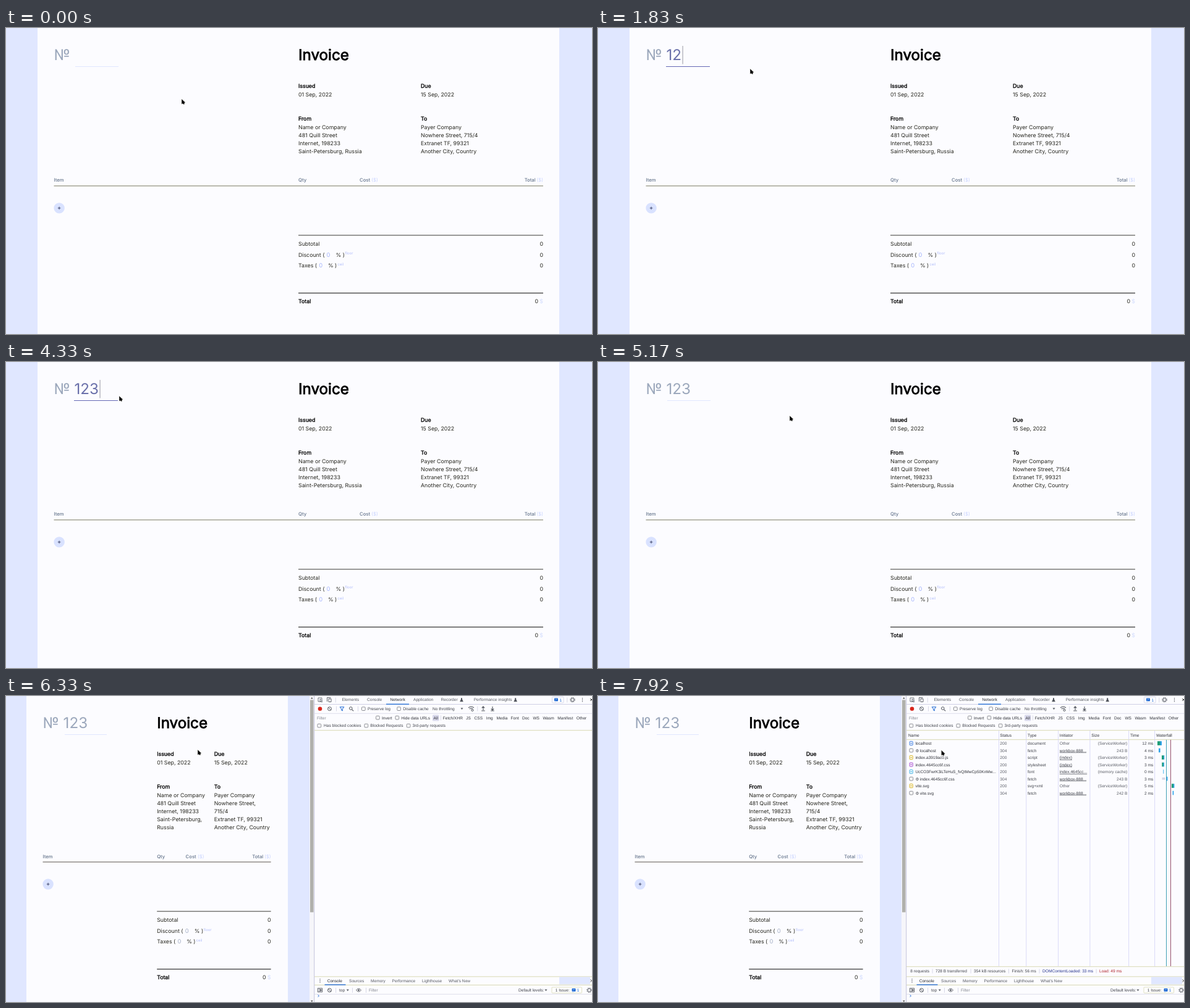
Recreate the animation shown at these times as an HTML page. Size 948x496 px, loop 8 s.

```html
<!DOCTYPE html>
<html lang="en">
<head>
<meta charset="utf-8">
<title>Invoice</title>
<style>
  html, body { margin: 0; width: 100%; height: 100%; overflow: hidden; background: #fcfcff; }
  svg { display: block; width: 948px; height: 496px; }
  text { white-space: pre; text-rendering: geometricPrecision; }
  .page text { font-family: Inter, sans-serif; }
  .page .bold { stroke: #000; stroke-width: .036em; }
  .tools text { font-family: "Liberation Sans", "DejaVu Sans", sans-serif; }
</style>
</head>
<body>
<svg id="stage" viewBox="0 0 948 496" xmlns="http://www.w3.org/2000/svg"></svg>
<script>
const LOOP = 8000, STEP = 1000 / 12;
const PAPER = '#fcfcff', LILAC = '#e0e7ff', INK = '#26261e', PALE = '#c7d2fe',
      SLATE = '#64748b', MUTED = '#9ca8bc', GREY = '#5c5f67', BLUE = '#1a66d2', RULE = '#d9d9b4';

const text = (x, y, str, size, fill, extra = '') =>
  `<text x="${x}" y="${y}" font-size="${size}" fill="${fill}" ${extra}>${str}</text>`;
const rect = (x, y, w, h, fill, extra = '') =>
  `<rect x="${x}" y="${y}" width="${w}" height="${h}" fill="${fill}" ${extra}/>`;
const path = (d, stroke, width = 1, fill = 'none') =>
  `<path d="${d}" stroke="${stroke}" stroke-width="${width}" fill="${fill}"/>`;
const group = (id, body, cls = '') => `<g id="${id}" class="${cls}">${body}</g>`;
const END = 'text-anchor="end"', BOLD = 'class="bold"', MEDIUM = 'font-weight="500"';

// ---------- invoice ----------
const FROM = ['Name or Company', '481 Quill Street', 'Internet, 198233', 'Saint-Petersburg, Russia'];
const TO = ['Payer Company', 'Nowhere Street, 715/4', 'Extranet TF, 99321', 'Another City, Country'];
const FROM_WRAPPED = [...FROM.slice(0, 3), 'Saint-Petersburg,', 'Russia'];
const TO_WRAPPED = [TO[0], 'Nowhere Street,', '715/4', ...TO.slice(2)];

const WIDE = { paper: [51, 844], left: 77.5, mid: 473, col: 671, cost: 572, right: 869, drop: 0,
               from: FROM, to: TO, zero: '#a5b4fc', rule: '#85856f' };
const NARROW = { paper: [33, 423], left: 59.5, mid: 244.2, col: 336.7, cost: 290.6, right: 428.6, drop: 13.1,
                 from: FROM_WRAPPED, to: TO_WRAPPED, zero: '#a5afc6', rule: '#6a645c' };

function page(p) {
  const body = (x, y, str, extra) => text(x, y, str, 8.8, INK, extra);
  const label = (x, y, str) => text(x, y, str, 8.8, '#000', BOLD);
  const head = (x, y, str, extra = '') => text(x, y, str, 7.7, SLATE, MEDIUM + ' ' + extra);
  const unit = (x, y, extra = '') => text(x, y, '($)', 7.7, PALE, extra);
  const block = (x, title, lines, y) =>
    label(x, y, title) + lines.map((s, i) => body(x, y + 13.2 * (i + 1), s)).join('');
  const rate = (y, name, zeroX, pctX, noteX, note) =>
    body(p.mid, y, name) + text(p.mid + zeroX, y, '0', 9.4, p.zero) +
    body(p.mid + pctX, y, '% )') + text(p.mid + noteX, y - 3.2, note, 6, '#b0bcfa') ;
  const rule = (x, y, color) => rect(x, y, p.right - x, 1.1, color);
  const d = p.drop;
  return rect(p.paper[0], 0, p.paper[1], 496, PAPER) +
    text(p.left, 52, '№', 24.2, MUTED) +
    text(p.mid, 52, 'Invoice', 24.2, '#000', BOLD) +
    block(p.mid, 'Issued', ['01 Sep, 2022'], 97.4) + block(p.col, 'Due', ['15 Sep, 2022'], 97.4) +
    block(p.mid, 'From', p.from, 150.3) + block(p.col, 'To', p.to, 150.3) +
    head(p.left, 249.4 + d, 'Item') + head(p.mid, 249.4 + d, 'Qty') + head(p.cost, 249.4 + d, 'Cost') +
    unit(p.cost + 19.3, 249.4 + d) + head(p.right - 12.3, 249.4 + d, 'Total', END) + unit(p.right, 249.4 + d, END) +
    rule(p.left, 255.4 + d, p.rule) +
    `<circle cx="${p.left + 8.6}" cy="${291.9 + d}" r="8.7" fill="#d9e2ff"/>` +
    path(`M${p.left + 6.3} ${291.9 + d}h4.6m-2.3 -2.3v4.6`, '#343a60', 0.9) +
    rule(p.mid, 335.4 + d, '#4a4a44') +
    body(p.mid, 353.1 + d, 'Subtotal') +
    rate(370.6 + d, 'Discount (', 45.6, 60.6, 75.3, 'floor') +
    rate(388.1 + d, 'Taxes (', 33.2, 48, 63.3, 'ceil') +
    [353.1, 370.6, 388.1].map(y => body(p.right, y + d, '0', END)).join('') +
    rule(p.mid, 429.1 + d, '#1c1c1c') +
    label(p.mid, 446.3 + d, 'Total') + body(p.right - 8, 446.3 + d, '0', END) +
    text(p.right, 446.3 + d, '$', 8.8, '#d2dcfd', END);
}

const wide = group('wide', page(WIDE) +
  rect(112, 62, 70, 1, LILAC, 'id="line"') + text(110.4, 52, '', 24.2, MUTED, 'id="number"') +
  rect(0, 29, 0.9, 29.5, '#8c8c98', 'id="caret"') +
  group('hint', text(141, 81, '1', 7.4, INK) + rect(135, 89.5, 24, 1, PALE)), 'page');

const narrow = group('narrow', page(NARROW) +
  text(92.6, 52, '123', 24.2, MUTED) + rect(95, 62, 68, 1, LILAC) +
  rect(491, 0, 8, 496, '#f6f6fa') + rect(492, 6.5, 5.5, 344, '#b0b0ac') +
  path('M493 4.5l1.8 -2.5 1.8 2.5zM493 493.5l1.8 2.5 1.8 -2.5z', 'none', 0, '#555'), 'page');

// ---------- developer tools ----------
const say = (x, y, str, fill = '#40434a', extra = '') => text(x, y + 2.3, str, 6.6, fill, extra);
const row = (y, items, fill) => items.map(([x, str]) => say(x, y, str, fill)).join('');
const check = (x, y) => rect(x, y - 2.8, 5.6, 5.6, '#fff', 'rx="1" stroke="#70737a" stroke-width=".8"');
const bar = (x, y, h = 8) => rect(x, y - h / 2, 0.7, h, '#c9c9dc');
const hline = (y, fill = RULE) => rect(499, y, 449, 1, fill);
const circle = (x, y, r, fill, stroke = 'none') =>
  `<circle cx="${x}" cy="${y}" r="${r}" fill="${fill}" stroke="${stroke}"/>`;
const clearIcon = y => circle(523.5, y, 3, 'none', '#50545c') + path(`M521.4 ${y - 2.1}l4.2 4.2`, '#50545c');
const gear = (x, y) => circle(x, y, 2.6, 'none', '#50545c') +
  `<circle cx="${x}" cy="${y}" r="3.8" fill="none" stroke="#50545c" stroke-width="1" stroke-dasharray="1.5"/>`;
const down = (x, y) => path(`M${x - 2} ${y - 1.3}h4l-2 3z`, 'none', 0, '#60646c');
const flask = x => path(`M${x - 1} 3.2h2v2l1.8 4h-5.6l1.8 -4z`, 'none', 0, '#50545c');
const dots = (x, y) => [-2.5, 0, 2.5].map(k => circle(x, y + k, 0.7, '#50545c')).join('');
const note = (x, y) => rect(x, y - 2.8, 6, 5, BLUE, 'rx=".8"') +
  path(`M${x + 1} ${y + 2}v2l2 -2zM${x + 1.4} ${y - 1}h3.2`, '#fff', 0.6, BLUE);
const arrow = (x, dir) => path(`M${x} ${20 + 3 * dir}v${-6 * dir}m-2.3 ${2.3 * dir}l2.3 ${-2.3 * dir} 2.3 ${2.3 * dir}M${x - 2.8} 24h5.6`, '#50545c', 1.1);

const frame = rect(499, 0, 449, 496, PAPER) + rect(498.2, 0, 1, 496, '#c4c4dc') +
  row(6.1, [[543.5, 'Elements'], [584, 'Console'], [659, 'Application'], [703.5, 'Recorder'], [756.7, 'Performance insights']], '#55585f') +
  say(621.5, 6.1, 'Network', '#26282c') + hline(13, '#d0d0e6') + rect(615, 12.6, 37, 1.3, BLUE) +
  hline(454.4) + dots(508, 461.5) + rect(895, 455.4, 50, 12, LILAC) +
  say(519.7, 461.4, 'Console', '#26282c') +
  row(461.4, [[555, 'Sources'], [590, 'Memory'], [624.5, 'Performance'], [673, 'Lighthouse'], [716, 'What’s New']], '#55585f') +
  hline(468) + rect(515.5, 467.4, 34, 1.3, BLUE) +
  path('M945.5 459.5l4 4m0 -4l-4 4', '#444', 1);

const loading = rect(895, 0, 53, 13, LILAC);

const toolbar = path('M510 9l-5 0 0 -6 6 0 0 2M508 5l4 1.6 -1.7 .7 1.5 2 -1 .8 -1.4 -2 -1.2 1.2z', '#50545c', 0.8) +
  path('M519.5 9V2.5h6M522 4.5h4v5h-4z', '#50545c', 0.9) + bar(532.8, 6.5) +
  flask(737) + flask(824.2) +
  rect(883.5, 1.5, 18.5, 9.6, '#fff', 'rx="1" stroke="#d0d0e8" stroke-width=".8"') + note(887, 6.2) + say(895.5, 6.2, '1', BLUE) +
  bar(907.5, 6.5) + gear(916.5, 6.2) + dots(932.5, 6.2) + path('M945 4l4 4m0 -4l-4 4', '#444') +
  circle(508, 20.7, 3.3, '#d8261c') + clearIcon(20.7) + bar(534, 20.7) +
  path('M540.2 17.8h6.6l-2.5 3.2v3l-1.6 -.9v-2.1z', BLUE, 1) +
  circle(557.8, 20, 2.3, 'none', '#50545c') + path('M559.6 21.8l2.6 2.6', '#50545c', 1.1) + bar(569, 20.7) +
  check(575.5, 20.7) + say(585, 20.7, 'Preserve log') + check(632.8, 20.7) + say(642.3, 20.7, 'Disable cache') +
  say(690, 20.7, 'No throttling') + down(737.5, 20.5) +
  path('M748 19q4.5 -3.6 9 0M749.8 21q2.7 -2 5 -.2', '#50545c', 1.1) + circle(754.5, 23, 1.6, 'none', '#50545c') +
  bar(762.5, 20.7) + arrow(772, 1) + arrow(787, -1) + hline(27.8, '#dedeec') +
  say(503, 35.4, 'Filter', '#858890') + check(598.6, 35.2) + check(630, 35.2) +
  rect(690, 30.4, 10.5, 10, '#d9d9ec', 'rx="1.5"') +
  row(35.4, [[608, 'Invert'], [639.5, 'Hide data URLs'], [691.6, 'All'], [706.8, 'Fetch/XHR'], [744.3, 'JS'],
    [757.6, 'CSS'], [776.8, 'Img'], [793.4, 'Media'], [816.6, 'Font'], [834.9, 'Doc'], [852.4, 'WS'],
    [868.4, 'Wasm'], [892.3, 'Manifest'], [922.8, 'Other']], '#303238') + bar(703.3, 35.4) +
  check(504, 48.1) + check(580, 48.1) + check(648.3, 48.1) +
  row(48.1, [[514, 'Has blocked cookies'], [589.3, 'Blocked Requests'], [657.5, '3rd-party requests']]) +
  hline(55.2) +
  rect(504.5, 473.8, 7, 6, 'none', 'stroke="#50545c" stroke-width=".9"') + path('M507 474v6M508.3 475l2.4 1.8 -2.4 1.8z', '#50545c', 0.7, '#50545c') +
  clearIcon(476.9) + bar(533.4, 477) + say(539, 476.9, 'top') + down(552.8, 476.8) + bar(560, 477) +
  path('M566.5 476.8q4 -5 8 0q-4 5 -8 0z', '#50545c', 0.9) + circle(570.5, 476.8, 1.4, '#50545c') + bar(582, 477) +
  say(587, 476.9, 'Filter', '#858890') + say(829, 476.9, 'Default levels:') + down(873.5, 476.8) +
  rect(883, 472, 48.5, 9.4, '#fff', `rx="1" stroke="${RULE}" stroke-width=".8"`) + say(888.7, 476.9, '1 Issue:') +
  note(915.5, 476.9) + say(923.8, 476.9, '1', BLUE) + gear(943.5, 476.9) +
  hline(482.8, '#dedeec') + path('M504.5 484.5l2 1.6 -2 1.6', BLUE, 0.9);

// name, nested, status, type, initiator, size, time, icon colour, bars [x, width, colour]
const SW = '(ServiceWorker)', BOX = 'workbox-888...', GREEN = '#1d9c78', SKY = '#2ea2ea', CSS_FILE = 'index.4645cc6f.css';
const request = (name, nested, status, type, by, size, time, icon, ...bars) =>
  ({ name, nested, status, type, by, size, time, icon, bars });
const CHECK = '#8c909a';
const DONE = [
  request('localhost', 0, 200, 'document', 'Other', SW, '12 ms', '#3a7be0', [905, 5, GREEN], [909.5, 2.5, SKY]),
  request('localhost', 1, 304, 'fetch', BOX, '243 B', '4 ms', CHECK, [907, 2.6, SKY]),
  request('index.a3919ac0.js', 0, 200, 'script', '(index)', SW, '3 ms', '#d8b420', [912, 3.6, GREEN], [915, 1.2, SKY]),
  request(CSS_FILE, 0, 200, 'stylesheet', '(index)', SW, '3 ms', '#a64bd0', [912.3, 2.6, GREEN], [914.6, 1.3, SKY]),
  request('UcCO3FwrK3iLTeHuS_fvQtMwCp50KnMw...', 0, 200, 'font', 'index.4645cc...', '(memory cache)', '0 ms', '#3fb2e4', [914, 1.4, '#78c8f0']),
  request(CSS_FILE, 1, 304, 'fetch', BOX, '243 B', '3 ms', CHECK, [912.5, 5, '#d4d4e4'], [919, 2.4, SKY]),
  request('vite.svg', 0, 200, 'svg+xml', 'Other', SW, '5 ms', '#d8b420', [928, 3.2, GREEN], [930.8, 1.6, SKY]),
  request('vite.svg', 1, 304, 'fetch', BOX, '242 B', '2 ms', CHECK, [929.6, 1.7, SKY])
];
const RUNNING = DONE.slice(0, 6).map((r, i) => i > 1 && i < 5 ? { ...r, icon: null } : r);
RUNNING[2] = { ...RUNNING[2], time: '5 ms' };
RUNNING[5] = { ...RUNNING[5], status: '(pending)', size: '0 B', time: 'Pending', bars: [[912, 5, '#9088b4']] };

function requestRow(r, i) {
  const y = 76.7 + i * 11.5;
  const link = r.by !== 'Other';
  const icon = !r.icon ? '' : r.icon === CHECK ? check(504, y) :
    rect(504.2, y - 3, 5, 6, '#fff', `rx=".6" stroke="${r.icon}" stroke-width="1"`) + rect(505.5, y - 0.6, 2.4, 1.2, r.icon);
  return icon + (r.nested ? say(513.4, y, '⚙') : '') + say(r.nested ? 520.8 : 513.4, y, r.name, '#303238') +
    say(650.3, y, r.status, GREY) + say(695, y, r.type) +
    say(746.8, y, r.by, link ? '#3c3f46' : GREY, link ? 'text-decoration="underline"' : '') +
    say(856.3, y, r.size, GREY, END) + say(898.2, y, r.time, '#40434a', END) +
    r.bars.map(([x, w, c]) => rect(x, y - (w > 4 && c !== GREEN ? 2 : 3.4), w, w > 4 && c !== GREEN ? 3.5 : 6.6, c)).join('');
}

const table = requests =>
  row(63.4, [[502, 'Name'], [650.3, 'Status'], [695, 'Type'], [746.8, 'Initiator'], [798.3, 'Size'], [861, 'Time'], [903, 'Waterfall']], '#303238') +
  hline(70.2) +
  [648, 692.4, 744.3, 795.5, 858.3, 900.3].map(x => rect(x, 56, 0.8, 382, '#d2d2f6')).join('') +
  requests.map(requestRow).join('') + hline(438.2);
const summary = items => items.map(([x, str, fill], i) => say(x, 446, str, fill) + (i ? bar(x - 5.3, 446, 7) : '')).join('');

const running = table(RUNNING) +
  summary([[505.3, '6 requests'], [546, '243 B transferred'], [609, '343 kB resources'], [669.5, 'Finish: 22 ms']]);
const done = table(DONE) + rect(919, 71, 1, 367, '#3fa0b4') + rect(926, 71, 1, 367, '#94506c') +
  summary([[505.3, '8 requests'], [546, '728 B transferred'], [608, '354 kB resources'], [669.5, 'Finish: 56 ms'],
    [719, 'DOMContentLoaded: 33 ms', '#26348c'], [811, 'Load: 49 ms', '#b0242c']]);

const pointer = group('arrow', path('M0 0V8.6L2 7.6 3.2 9 5 8.2 4.6 6.4 6.2 5.8Z', '#e8e8e0', 0.4, '#0a0a0a')) +
  group('beam', path('M-1.8 -3.8h3.6M0 -3.8v7.6M-1.8 3.8h3.6', '#55555c', 0.9));

const stage = document.getElementById('stage');
stage.innerHTML = rect(0, 0, 948, 496, LILAC) + wide + narrow +
  group('tools', frame + group('loading', loading) + group('toolbar', toolbar) +
    group('running', running) + group('done', done), 'tools') + group('pointer', pointer);

// ---------- timeline ----------
const POINTER = [[0, 284, 115], [330, 284, 115], [420, 240, 96], [500, 176, 68], [580, 149, 56.5], [1580, 149, 56.5],
  [1670, 222, 62], [1750, 222, 62], [1830, 246, 66], [2000, 267, 69], [2580, 267, 69], [2670, 264, 68], [2750, 264, 68],
  [2920, 260.6, 70], [3000, 238, 72], [3080, 196, 62], [3170, 158, 48], [3750, 158, 48], [3920, 144, 46], [4250, 144, 46],
  [4330, 183, 55], [4500, 262, 76], [4670, 303, 84], [4750, 303, 84], [5000, 310, 87], [6830, 310, 87],
  [7000, 307, 98], [7250, 307, 98], [7330, 330, 97], [7670, 555.4, 87.8], [8000, 555.4, 87.8]];
const FIELD = [ // time, value, caret x (0 when blurred)
  [0, '', 0], [580, '', 110.2], [1330, '1', 122], [1500, '12', 136.6], [2000, '12', 0],
  [3330, '12', 136.6], [3580, '123', 151.6], [4580, '123', 0]];

const $ = id => document.getElementById(id);
const show = (id, on) => $(id).setAttribute('display', on ? 'inline' : 'none');
const set = (id, attrs) => Object.entries(attrs).forEach(([k, v]) => $(id).setAttribute(k, v));

function pointerAt(t) {
  const i = Math.max(1, POINTER.findIndex(k => k[0] >= t));
  const [a, ax, ay] = POINTER[i - 1], [b, bx, by] = POINTER[i];
  const f = Math.min(1, Math.max(0, (t - a) / (b - a)));
  return [ax + (bx - ax) * f, ay + (by - ay) * f];
}

function draw(now) {
  const t = Math.round(Math.floor((now % LOOP + 4) / STEP) * STEP / 10) * 10;
  const [x, y] = pointerAt(t);
  const [, value, caret] = FIELD.filter(k => k[0] <= t).pop();
  const open = t >= 5830;

  show('wide', !open);
  show('narrow', open);
  show('tools', open);
  show('loading', t < 5920);
  show('toolbar', t >= 5920);
  show('running', t >= 7000 && t < 7170);
  show('done', t >= 7170);

  $('number').textContent = value;
  set('number', { fill: caret ? '#6a70aa' : MUTED });
  set('line', { x: caret ? 110 : 112, width: caret ? 71 : 70, fill: caret ? '#6468b4' : LILAC });
  set('caret', { x: caret });
  show('caret', caret);
  show('hint', caret && value.length < 2);

  const beam = !open && x > 110 && x < 182 && y > 28 && y < 62;
  show('arrow', !beam);
  show('beam', beam);
  set('pointer', { transform: `translate(${x} ${y})` });
}

function tick() {
  draw(performance.now());
  requestAnimationFrame(tick);
}
tick();
</script>
</body>
</html>
```
